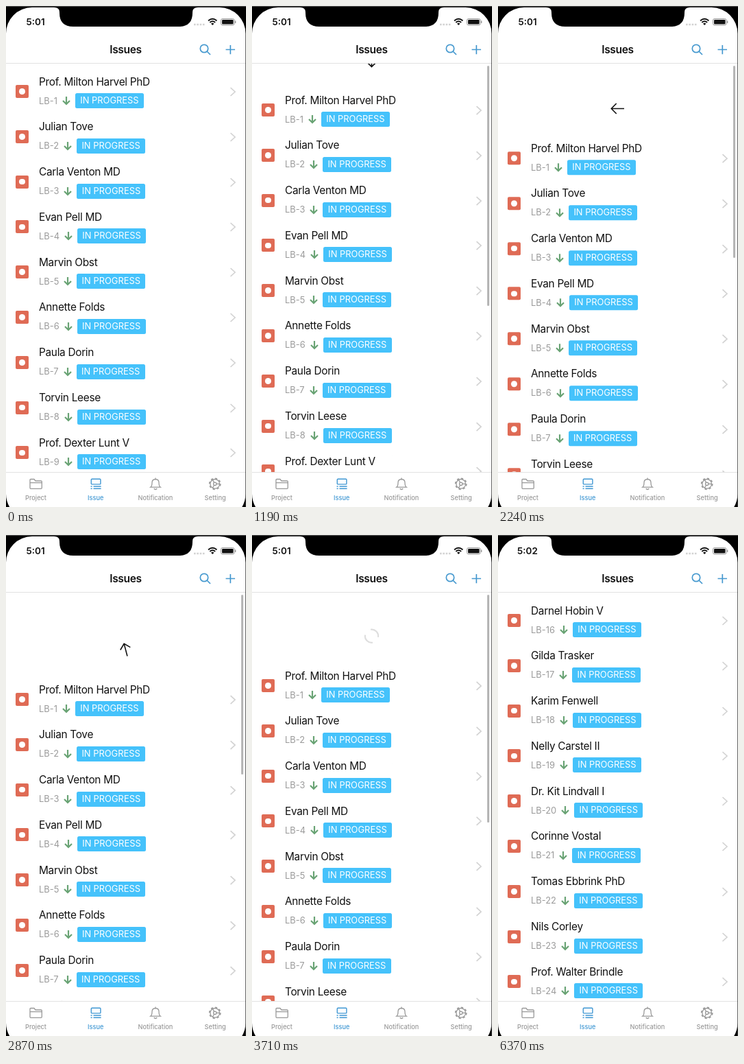
Write an HTML page that moves like this. It is 350 px wide and 730 px high and loops after 6.44 s.

```html
<!DOCTYPE html>
<html lang="en">
<head>
<meta charset="utf-8">
<title>Issues</title>
<style>
html, body { margin: 0; width: 100%; height: 100%; overflow: hidden; background: #fff; }
body { font-family: Inter, "Liberation Sans", sans-serif; }
#stage { position: relative; width: 350px; height: 730px; overflow: hidden; }
#view { position: absolute; top: 84px; width: 350px; height: 595px; overflow: hidden; }
#list { position: absolute; top: 8px; width: 350px; }
.row { position: relative; height: 65.8px; }
.row > * { position: absolute; }
.name { left: 48px; top: 8.5px; font-size: 15.4px; letter-spacing: -.3px; line-height: 20px; color: #111; white-space: nowrap; }
.meta { left: 48px; top: 35px; height: 22px; display: flex; align-items: center; font-size: 12.9px; color: #9b9b9b; }
.meta svg { margin: 0 7px; }
.badge { width: 100px; line-height: 22px; border-radius: 2.5px; background: #45c2fb; color: #fff; text-align: center; white-space: nowrap; }
.icon { left: 14px; top: 23px; width: 19px; height: 19px; border-radius: 2px; background: #df6b55; }
.icon::after { content: ""; position: absolute; inset: 5.2px; border-radius: 50%; background: #fff; }
.next { left: 325px; top: 25px; }
svg { display: block; fill: none; }
#chrome { position: absolute; left: 0; top: 0; }
#bar { position: absolute; left: 343px; top: 87px; width: 3.4px; border-radius: 2px; background: #b5b5b5; }
text { text-anchor: middle; }
</style>
</head>
<body>
<div id="stage">
  <div id="view">
    <div id="list"></div>
    <svg width="350" height="595" style="position:absolute">
      <g id="arrow" stroke="#111" stroke-width="1.6"><path d="M0-9.5V9M-7.5 1.8L0 9.2L7.5 1.8"/></g>
      <g id="spinner" stroke="#dedede" stroke-width="2.2"><path d="M5.6-7.8A9.6 9.6 0 0 1 5.6 7.8M-5.6 7.8A9.6 9.6 0 0 1-5.6-7.8"/></g>
    </svg>
  </div>
  <div id="bar"></div>
  <svg id="chrome" width="350" height="730">
    <path d="M0 83.5H350M0 679.5H350" stroke="#e2e2e2"/>
    <g fill="#111" font-weight="600">
      <text id="clock" x="43" y="28" font-size="13.5"></text>
      <text x="174.5" y="69" font-size="15.5" letter-spacing="-.3">Issues</text>
    </g>
    <path d="M274 27H290" stroke="#d2d2d2" stroke-width="2.6" stroke-dasharray="2.6 1.7"/>
    <g stroke="#111">
      <path d="M295 21.5Q301.2 16 307.4 21.5M297.3 24Q301.2 20.5 305.1 24" stroke-width="1.9"/>
      <path d="M299 25.7Q301.2 24 303.4 25.7L301.2 28Z" fill="#111" stroke="none"/>
      <rect x="313.5" y="18.5" width="19.5" height="9.5" rx="2.5" stroke="#999"/>
      <rect x="315" y="20" width="16.5" height="6.5" rx="1.2" fill="#111" stroke="none"/>
      <path d="M334.6 21.5V25" stroke="#999" stroke-width="1.4"/>
    </g>
    <g stroke="#4699cf" stroke-width="1.7">
      <circle cx="289" cy="62" r="5.7"/><path d="M293 66L298 71M320.5 63.5H334M327.3 57V70.3"/>
    </g>
    <g stroke="#999" stroke-width="1.3">
      <path d="M35 702V690.5Q35 689.5 36 689.5H41L43 692H51Q52.3 692 52.3 693V702Q52.3 703.3 51 703.3H36Q35 703.3 35 702ZM35 694.7H52"/>
      <path d="M210.7 701.2Q213 699.5 213 694.5Q213 689.8 218 689.5Q223 689.8 223 694.5Q223 699.5 225.3 701.2ZM218 687.5V689.5M215.8 703Q218 706 220.2 703"/>
      <circle cx="304.7" cy="696.3" r="6.8"/><circle cx="304.7" cy="696.3" r="2.2"/>
      <circle cx="304.7" cy="696.3" r="8" stroke-width="1.8" stroke-dasharray="3.14 3.14"/>
      <path d="M306.9 696.3H311.5M303.6 694.4L301.3 690.4M303.6 698.2L301.3 702.2"/>
    </g>
    <g stroke="#3f97d3" stroke-width="1.4">
      <rect x="124.3" y="689.3" width="13.6" height="7.6" rx="1"/>
      <path d="M123.6 700H125.6M127.5 700H138.6M123.6 703.3H125.6M127.5 703.3H138.6"/>
    </g>
    <g id="tabs" font-size="9.2" font-weight="500"></g>
    <path d="M0 0H350V730H0ZM0 40V788H349.4V40A38 38 0 0 0 311.4 2H280Q272 2 272 9V10Q272 30 252 30H98Q78 30 78 10V9Q78 2 70 2H38A38 38 0 0 0 0 40Z" fill="#000" fill-rule="evenodd"/>
    <path d="M0 711V730H5.2A38 38 0 0 1 0 711M349.4 711V730H344.2A38 38 0 0 0 349.4 711" fill="#000"/>
    <path d="M0 .5H350" stroke="#555"/>
  </svg>
</div>
<script>
const LOOP = 6440, RELEASE = 3500, CLOCK_TICK = 4410, LOADED = 5250;
const $ = id => document.getElementById(id);

const before = ["Prof. Milton Harvel PhD", "Julian Tove", "Carla Venton MD", "Evan Pell MD", "Marvin Obst",
  "Annette Folds", "Paula Dorin", "Torvin Leese", "Prof. Dexter Lunt V"];
const after = ["Darnel Hobin V", "Gilda Trasker", "Karim Fenwell", "Nelly Carstel II", "Dr. Kit Lindvall I",
  "Corinne Vostal", "Tomas Ebbrink PhD", "Nils Corley", "Prof. Walter Brindle"];

// Pull distance: [ms, px]
const pull = [[0, 0], [560, 0], [1190, 27], [1680, 70], [2870, 115], [3430, 119], [3710, 95],
  [4200, 77], [4690, 74], [5180, 74], [5350, 30], [5700, 0], [LOOP, 0]];

const slope = i => pull[i + 1] ? (pull[i + 1][1] - pull[i][1]) / (pull[i + 1][0] - pull[i][0]) : 0;
const tangent = i => {
  const a = i ? slope(i - 1) : 0, b = slope(i);
  return a * b > 0 ? 2 * a * b / (a + b) : 0;
};

// Monotone cubic through the pull points
function offsetAt(t) {
  let i = 0;
  while (t >= pull[i + 1][0]) i++;
  const [t0, y0] = pull[i], [t1, y1] = pull[i + 1], d = t1 - t0, u = (t - t0) / d, v = 1 - u;
  return v * v * (1 + 2 * u) * y0 + u * u * (3 - 2 * u) * y1
    + d * u * v * (v * tangent(i) - u * tangent(i + 1));
}

const clamp = x => Math.max(0, Math.min(1, x));

const rowHtml = (name, id) => `<div class="row"><div class="icon"></div><div class="name">${name}</div>
  <div class="meta"><span>LB-${id}</span>
  <svg width="12" height="14" stroke="#69a374" stroke-width="2.2"><path d="M6 1V12M1 7L6 12L11 7"/></svg>
  <span class="badge">IN PROGRESS</span></div>
  <svg class="next" width="12" height="16" stroke="#d3d3d3" stroke-width="1.7"><path d="M2.5 2L9 8L2.5 14"/></svg></div>`;
const pages = [[before, 1], [after, 16]].map(([names, first]) =>
  names.map((name, i) => rowHtml(name, first + i)).join(""));

$("tabs").innerHTML = ["Project", "Issue", "Notification", "Setting"].map((label, i) =>
  `<text x="${43.5 + 87.2 * i}" y="720.3" fill="${i === 1 ? "#3f97d3" : "#999"}">${label}</text>`).join("");

let page = -1;
function draw(t) {
  const y = offsetAt(t), loading = t >= RELEASE, current = +(t >= LOADED);
  if (current !== page) $("list").innerHTML = pages[page = current];
  $("list").style.transform = `translateY(${y}px)`;

  const place = angle => `translate(174.5 ${y - 31.7}) rotate(${angle})`;
  $("arrow").setAttribute("transform", place(180 * clamp((y - 76) / 42.5)));
  $("spinner").setAttribute("transform", place((t - 5180) * .398));
  $("arrow").style.display = loading ? "none" : "";
  $("spinner").style.display = loading ? "" : "none";

  const inset = loading ? 50 * clamp(y / 74) : 0;
  $("bar").style.height = 377 - y + inset + "px";
  $("bar").style.opacity = clamp((t - 560) / 140) * clamp((5810 - t) / 250);
  $("clock").textContent = t < CLOCK_TICK ? "5:01" : "5:02";
}

function tick() {
  draw(performance.now() % LOOP);
  requestAnimationFrame(tick);
}
tick();
</script>
</body>
</html>
```
